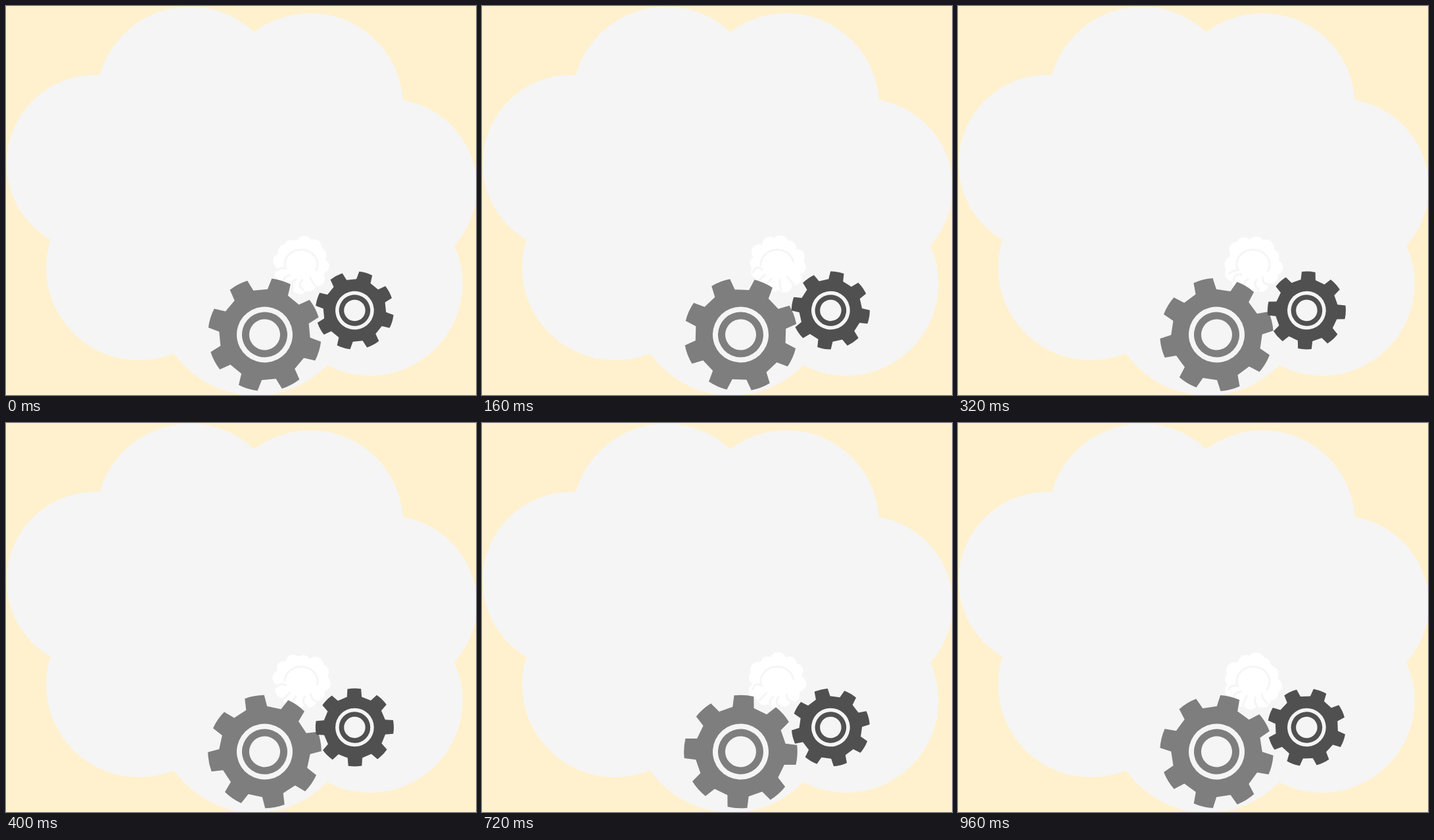
Recreate the animation shown at these times as an HTML page. Size 715x593 px, loop 1040 ms.

```html
<!DOCTYPE html>
<html lang="en">
<head>
<meta charset="utf-8">
<title>Gears in a cloud</title>
<style>
  html, body { margin: 0; height: 100%; overflow: hidden; background: #fff1ce; }
  svg { display: block; width: 100vw; height: 100vh; }
  .light { fill: #f5f5f5; }
  #puffs { fill: #fff; }
  #folds { fill: none; stroke: #f5f5f5; stroke-width: 3; stroke-linecap: round; }
</style>
</head>
<body>
<svg viewBox="0 0 715 593">
  <g class="light">
    <circle cx="280" cy="143.5" r="142.5"/>
    <circle cx="463" cy="152" r="141"/>
    <circle cx="136" cy="240" r="135"/>
    <circle cx="581.5" cy="276" r="134.5"/>
    <circle cx="202.5" cy="398.5" r="141.5"/>
    <circle cx="379.5" cy="443" r="151"/>
    <circle cx="554" cy="423" r="140.5"/>
    <circle cx="360" cy="290" r="190"/>
  </g>
  <g transform="translate(449 394)">
    <path id="puffs"/>
    <path id="folds"/>
  </g>
  <g id="big" fill="#7e7e7e"></g>
  <g id="small" fill="#505050"></g>
</svg>
<script>
const STEP = 80, STEPS = 13, TEETH = 8, PITCH = 360 / TEETH;
const $ = id => document.getElementById(id);

// Polar point, with the angle in degrees clockwise from the top
function point(r, deg, squash = 1) {
  const a = deg * Math.PI / 180;
  return `${(r * Math.sin(a)).toFixed(2)} ${(-r * squash * Math.cos(a)).toFixed(2)}`;
}

function gearShape() {
  const tip = 86.3, root = 69.3;
  let d = '';
  for (let i = 0; i < TEETH; i++) {
    const a = i * PITCH;
    d += `${i ? 'L' : 'M'}${point(root, a - 13.5)}L${point(tip, a - 10)}`
       + `A${tip} ${tip} 0 0 1 ${point(tip, a + 10)}L${point(root, a + 13.5)}`;
  }
  return `<path d="${d}Z"/><circle class="light" r="42.5"/><circle r="34.5"/><circle class="light" r="23.5"/>`;
}

function seeded(seed) {
  return () => {
    const x = Math.sin(++seed * 127.1) * 43758.5453;
    return x - Math.floor(x);
  };
}

const disc = (r, at) => `M${at}m${-r} 0a${r} ${r} 0 1 1 ${2 * r} 0a${r} ${r} 0 1 1 ${-2 * r} 0Z`;

// A billowing ball: lobes round the rim, one big curl and small creases below
function drawSmoke(step) {
  const rand = seeded(step * 100);
  let puffs = disc(38, '0 0'), folds = '';
  for (let i = 0; i < 12; i++) {
    puffs += disc(10 + 3 * rand(), point(30 + 4 * rand(), i * 30 + 12 * rand()));
  }
  const from = -110 + 40 * rand(), to = 80 + 50 * rand();
  folds += `M${point(25, from, .9)}A25 22.5 0 ${to - from > 180 ? 1 : 0} 1 ${point(25, to, .9)}`;
  for (let i = 0; i < 5; i++) {
    const a = 140 + i * 27 + 10 * rand();
    folds += `M${point(24, a)}Q${point(32, a + 20 * rand())} ${point(39, a)}`;
  }
  $('puffs').setAttribute('d', puffs);
  $('folds').setAttribute('d', folds);
}

function draw(now) {
  const step = Math.floor(now / STEP) % STEPS;
  const turn = step / STEPS * PITCH;
  $('big').setAttribute('transform', `translate(393.5 501) rotate(${17.2 + turn})`);
  $('small').setAttribute('transform', `translate(530.4 464) rotate(${16.7 - turn}) scale(.69)`);
  drawSmoke(step);
}

$('big').innerHTML = $('small').innerHTML = gearShape();
const start = performance.now();
function tick() {
  draw(performance.now() - start);
  requestAnimationFrame(tick);
}
tick();
</script>
</body>
</html>
```
